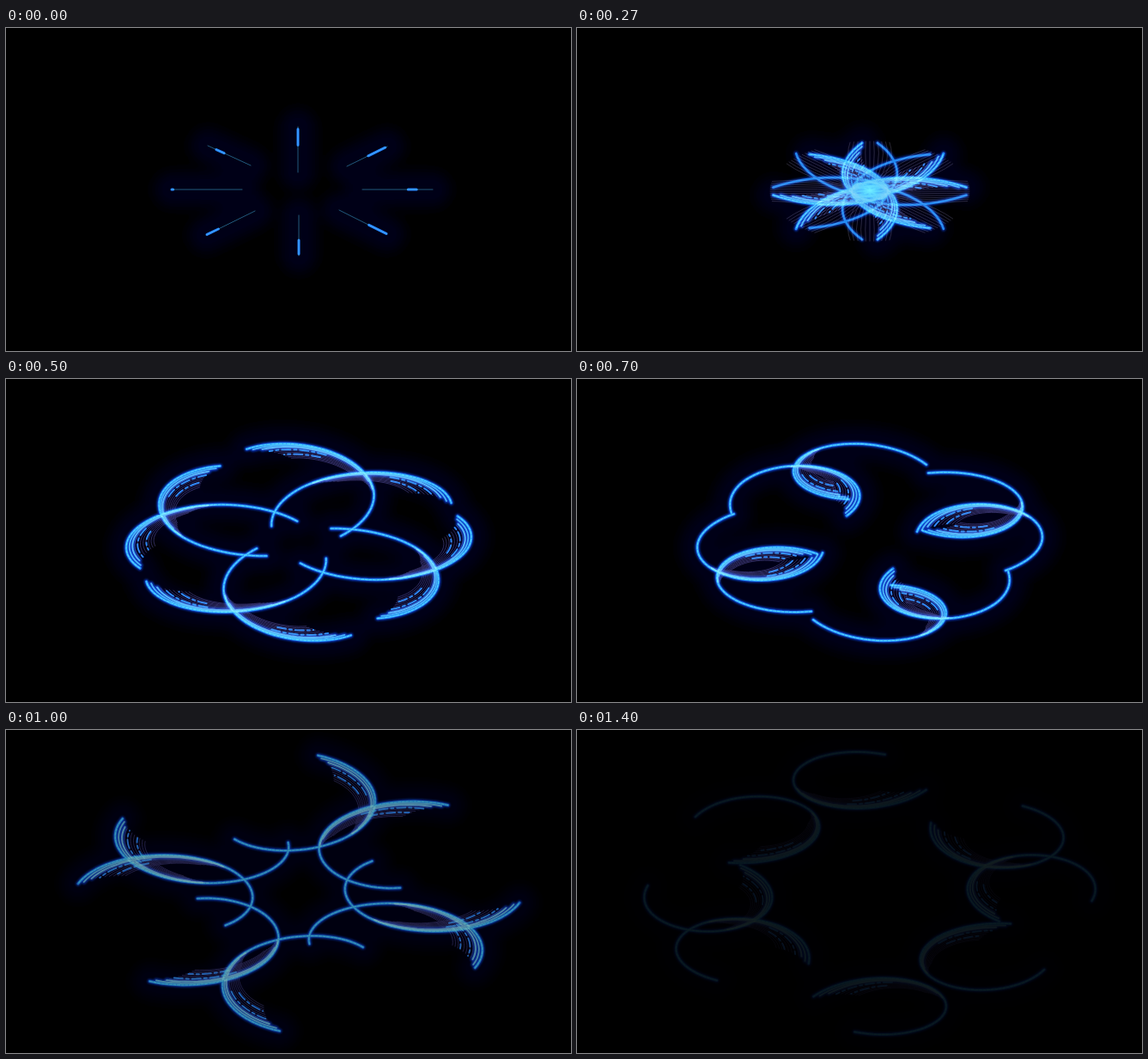
Animation, 658 px wide and 376 px high, one loop 1.5 s. Source, as an HTML page:

```html
<!DOCTYPE html>
<html lang="en">
<head>
<meta charset="utf-8">
<title>Light petals</title>
<style>
html, body { margin: 0; width: 100%; height: 100%; overflow: hidden; background: #000; }
svg { display: block; width: 658px; height: 376px; }
path { fill: none; stroke-linecap: round; stroke-linejoin: round; mix-blend-mode: screen; }
</style>
</head>
<body>
<svg viewBox="0 0 658 376">
  <defs>
    <filter id="soft" filterUnits="userSpaceOnUse" x="0" y="0" width="658" height="376"><feGaussianBlur stdDeviation="7"/></filter>
    <filter id="near" filterUnits="userSpaceOnUse" x="0" y="0" width="658" height="376"><feGaussianBlur stdDeviation="1.3"/></filter>
    <radialGradient id="flare">
      <stop offset="0" stop-color="#6cf2ff"/>
      <stop offset=".3" stop-color="#38c4ff" stop-opacity=".75"/>
      <stop offset="1" stop-color="#0a50e0" stop-opacity="0"/>
    </radialGradient>
  </defs>
  <rect width="658" height="376"/>
  <g id="stage"></g>
  <ellipse id="core" cx="341" cy="189" rx="34" ry="23" fill="url(#flare)"/>
</svg>
<script>
const LOOP = 1500, CX = 341, CY = 190;
const stage = document.getElementById('stage');
const core = document.getElementById('core');

// Radial streaks: inner end, outer end, span of the bright part.
const streaks = [
  [415, 188, 497, 188, .65, .77], [397, 161, 444, 138, .53, .95],
  [340, 168, 340, 115, .6, .95], [285, 160, 235, 137, .62, .8],
  [275, 188, 193, 188, .98, 1], [290, 213, 233, 241, .75, .98],
  [341, 218, 341, 265, .62, .96], [388, 212, 444, 240, .62, .98]
];

function layer(stroke, width, extra = {}) {
  const p = document.createElementNS('http://www.w3.org/2000/svg', 'path');
  const attrs = { stroke, 'stroke-width': width, ...extra };
  for (const k in attrs) p.setAttribute(k, attrs[k]);
  stage.appendChild(p);
  return p;
}
const halo = layer('#000026', 40, { filter: 'url(#soft)', opacity: .6 });
const fan = layer('#9088b0', .7);
const veil = layer('#6a62b4', .9, { opacity: .5 });
const glow = layer('#0a40d0', 5.2, { filter: 'url(#near)', opacity: .9 });
const line = layer('#1670f0', 3);
const spark = layer('#3a98ff', 1.3, { 'stroke-dasharray': '3 1.6' });
const bundle = layer('#3c9cf0', 1.9, { opacity: .9 });
const dashes = layer('#1c7cf0', 2, { 'stroke-dasharray': '10 4 3 4' });
const twinGlow = layer('#0a40d0', 5, { filter: 'url(#near)' });
const twin = layer('#1c7cf4', 2.6);
const thin = layer('#2f7f9c', 1);
const bold = layer('#2580ff', 3);

function ramp(t, pts) {
  if (t <= pts[0][0]) return pts[0][1];
  for (let i = 1; i < pts.length; i++) {
    const [a, u] = pts[i - 1], [b, v] = pts[i];
    if (t <= b) return u + (v - u) * (t - a) / (b - a);
  }
  return pts[pts.length - 1][1];
}

// A circle whose centre drifts outward, seen at half height.
function point(k, t, size = 1, flip = 1) {
  const dir = k * Math.PI / 4, c = Math.cos(dir), s = Math.sin(dir);
  const psi = (43 + .605 * (t - 500)) * Math.PI / 180;
  const spin = (k % 2 ? -1 : 1) * flip;
  const turns = t / 595, push = 70 * (1 - Math.exp(-((t / 230) ** 2)));
  const vx = k % 2 ? 66.5 : 60, vy = k % 2 ? 33.2 : 49;
  const r = 89 * Math.sin(Math.PI / 2 * Math.min(1, t / 320)) * size, a = dir + spin * psi;
  return [
    CX + c * (vx * turns + push) + r * Math.cos(a),
    CY - s * (vy * turns + push / 2) - r * Math.sin(a) / 2
  ];
}

const toPath = pts => pts.length < 2 ? '' :
  'M' + pts.map(p => p[0].toFixed(1) + ' ' + p[1].toFixed(1)).join('L');

// Part of one trail, pulled inward by "inset" towards its head.
function arc(k, head, from, to, inset = 0, flip = 1) {
  const a = Math.max(0, head - to), b = head - from, pts = [];
  if (b - a < 4) return '';
  const n = Math.ceil((b - a) / 8);
  for (let i = 0; i <= n; i++) {
    const t = a + (b - a) * i / n;
    const pull = inset * Math.max(0, 1 - (head - t) / 240);
    pts.push(point(k, t, 1 - pull, flip));
  }
  return toPath(pts);
}

const every = fn => [0, 1, 2, 3, 4, 5, 6, 7].map(fn).join('');
const set = (el, d) => el.setAttribute('d', d);

function fanLines(k, t) {
  const open = Math.min(1, t / 270), dir = k * Math.PI / 4;
  const reach = 150 - 34 * open;
  let d = '';
  for (let j = -5; j <= 5; j++) {
    const a = dir + j * .04 * open, m = dir + j * .11 * open;
    const x = CX + reach * Math.cos(a), y = CY - reach * Math.sin(a) / 2;
    const mx = CX + reach * .55 * Math.cos(m), my = CY - reach * .28 * Math.sin(m);
    d += `M${CX} ${CY}Q${mx.toFixed(1)} ${my.toFixed(1)} ${x.toFixed(1)} ${y.toFixed(1)}`;
  }
  return d;
}

function streak([x1, y1, x2, y2, b0, b1], t, bright) {
  const pull = 1 - t / 400;
  const at = f => [CX + (x1 + (x2 - x1) * f - CX) * pull, CY + (y1 + (y2 - y1) * f - CY) * pull];
  return toPath([at(bright ? b0 : 0), at(bright ? b1 : 1)]);
}

function draw(t) {
  const lag = ramp(t, [[500, 300], [700, 350], [1000, 368], [1400, 395]]);
  const trail = every(k => arc(k, t, 0, lag));
  const strands = every(k => arc(k, t, 6, 200, .055) + arc(k, t, 18, 185, .11));
  const early = t < 180;
  const rays = early ? streaks.map(s => streak(s, t, false)).join('') : '';
  set(halo, trail + rays);
  set(glow, trail + strands);
  set(line, trail);
  set(spark, trail);
  set(bundle, strands);
  set(veil, every(k => {
    let d = '';
    for (let j = 2; j < 11; j++) d += arc(k, t, 6 + j * 5, 215 - j * 4, j * .05);
    return d;
  }));
  set(dashes, every(k => arc(k, t, 45, 105, .36) + arc(k, t, 25, 110, .2)));
  bundle.setAttribute('stroke', t < 1000 ? '#46acff' : '#62b8a8');

  const both = ramp(t, [[0, 0], [120, .8], [270, .9], [400, .3], [480, 0]]);
  const mirror = both ? every(k => arc(k, t, 0, 300, 0, -1)) : '';
  set(twin, mirror);
  set(twinGlow, mirror);
  twin.setAttribute('opacity', both);
  twinGlow.setAttribute('opacity', both * .8);

  const haze = ramp(t, [[0, 0], [60, .2], [270, .4], [450, 0]]);
  set(fan, haze ? every(k => fanLines(k, t)) : '');
  fan.setAttribute('opacity', haze);

  const rayFade = ramp(t, [[0, 1], [180, 0]]);
  set(thin, rays);
  set(bold, early ? streaks.map(s => streak(s, t, true)).join('') : '');
  thin.setAttribute('opacity', rayFade * .7);
  bold.setAttribute('opacity', rayFade);

  core.setAttribute('opacity', ramp(t, [[0, 0], [120, .8], [270, .85], [400, .25], [480, 0]]));
  stage.setAttribute('opacity', ramp(t, [[700, 1], [1000, .7], [1200, .4], [1400, .12]]));
}

let shown = -1;
function tick(now) {
  const t = now % LOOP, step = t < 300 ? 30 : 100;
  const held = Math.floor(t / step) * step;
  if (held !== shown) draw(shown = held);
  requestAnimationFrame(tick);
}
draw(0);
requestAnimationFrame(tick);
</script>
</body>
</html>
```
